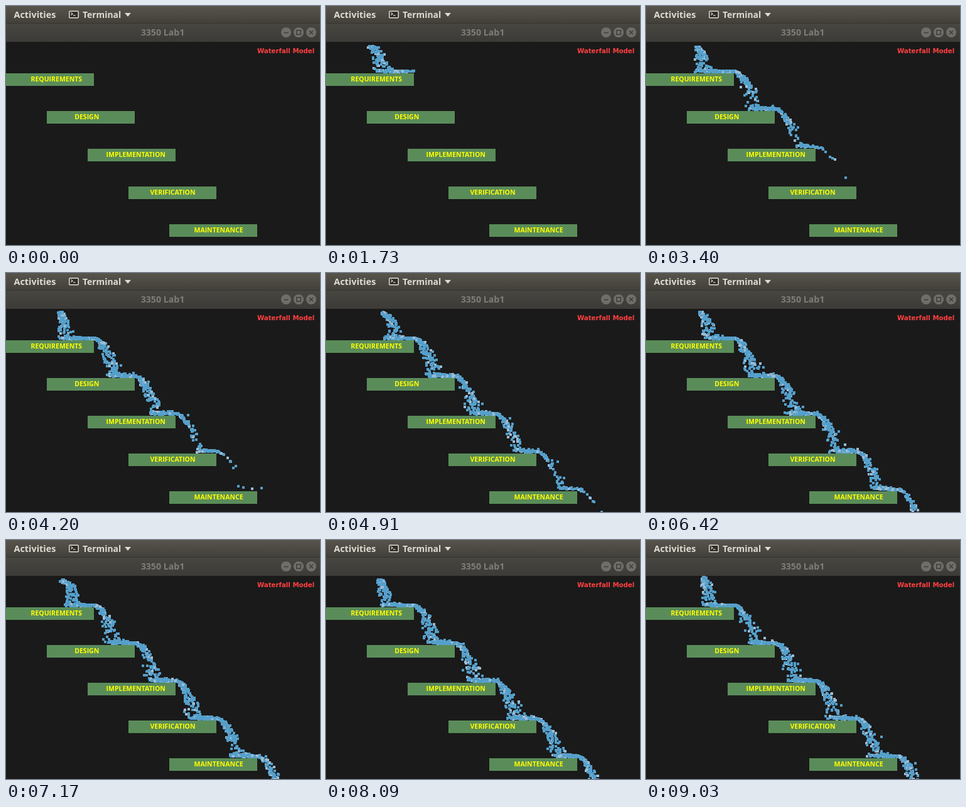
An HTML page with a canvas for the animation above (9.05 s loop, 500 px wide and 380 px high).

```html
<!DOCTYPE html>
<html lang="en">
<head>
<meta charset="utf-8">
<title>Waterfall Model</title>
<style>
  html, body { margin: 0; width: 100%; height: 100%; overflow: hidden; background: #1a1a1a; }
  canvas { display: block; }
</style>
</head>
<body>
<canvas id="stage" width="500" height="380"></canvas>
<script>
const ctx = document.getElementById('stage').getContext('2d');
const LOOP = 9050, START = 900, FRAME = 44.9;
const SUBSTEPS = 6, PER_SUBSTEP = 2, DT = FRAME / 1000 / SUBSTEPS;
const GRAVITY = 520, HALF = 2;

const steps = [
  ['REQUIREMENTS', 39.5], ['DESIGN', 109.2], ['IMPLEMENTATION', 159.5],
  ['VERIFICATION', 229.5], ['MAINTENANCE', 299.5]
].map(([label, textX], i) => ({ label, textX, x: 65 * i, y: 107 + 60 * i }));

// Pointer path that feeds the water: time, x, y
const pointer = [
  [900, 82, 62], [1400, 78, 63], [1730, 70, 64], [2600, 72, 64], [3000, 80, 64],
  [3400, 82, 66], [4200, 86, 63], [4680, 98, 64], [4910, 91, 64], [5450, 97, 64],
  [5720, 94, 65], [6500, 86, 63], [6950, 96, 64], [7170, 89, 64], [8000, 84, 64],
  [8700, 88, 63], [9050, 92, 60]
];

let seed, drops, frame;

function rnd() {
  seed = (seed * 1664525 + 1013904223) >>> 0;
  return seed / 4294967296;
}

function reset() {
  seed = 3350;
  drops = [];
  frame = 0;
}

function pointerAt(ms) {
  let i = 1;
  while (i < pointer.length - 1 && pointer[i][0] < ms) i++;
  const [t0, x0, y0] = pointer[i - 1], [t1, x1, y1] = pointer[i];
  const k = Math.min(1, (ms - t0) / (t1 - t0));
  return [x0 + (x1 - x0) * k, y0 + (y1 - y0) * k];
}

function emit(ms) {
  const [x, y] = pointerAt(ms);
  const drop = {
    x: x + rnd() * 6 - 3, y: y + rnd() * 4 - 2,
    vx: rnd() * 68, vy: rnd() * 30 - 10,
    speed: 30 + 42 * (rnd() + rnd()),
    rest: HALF + rnd() * 2.5,
    color: rnd() < 0.15 ? '#9dbcd3' : '#559fcb'
  };
  move(drop, rnd() * DT);
  drops.push(drop);
}

function move(d, dt) {
  const before = d.y;
  d.vy += GRAVITY * dt;
  d.x += d.vx * dt;
  d.y += d.vy * dt;
  for (const s of steps) {
    const floor = s.y - d.rest;
    if (d.x > s.x && d.x < s.x + 140 && before <= floor && d.y > floor) {
      d.y = floor;
      d.vy *= -(0.1 + 0.17 * rnd());
      d.vx += (d.speed - d.vx) * 0.6;
    }
  }
}

function advance() {
  for (let i = 0; i < SUBSTEPS; i++) {
    for (const d of drops) move(d, DT);
    for (let j = 0; j < PER_SUBSTEP; j++) emit(START + (frame + i / SUBSTEPS) * FRAME);
  }
  drops = drops.filter(d => d.y < 384);
  frame++;
}

function rect(x, y, w, h, fill) {
  ctx.fillStyle = fill;
  ctx.fillRect(x, y, w, h);
}

function text(str, x, y, font, fill, align = 'left') {
  ctx.font = font;
  ctx.fillStyle = fill;
  ctx.textAlign = align;
  ctx.fillText(str, x, y);
}

function line(points, color, width) {
  ctx.strokeStyle = color;
  ctx.lineWidth = width;
  ctx.beginPath();
  for (const [x, y] of points) ctx.lineTo(x, y);
  ctx.stroke();
}

function gradient(y0, y1, top, bottom) {
  const g = ctx.createLinearGradient(0, y0, 0, y1);
  g.addColorStop(0, top);
  g.addColorStop(1, bottom);
  return g;
}

function drawBars() {
  const light = '#dfdbd2', dark = '#3c3b37';
  rect(0, 0, 500, 28, gradient(0, 28, '#57544c', '#42403a'));
  text('Activities', 12.5, 19, 'bold 14.4px "Open Sans", sans-serif', light);
  text('Terminal', 122, 19, 'bold 13.9px "Open Sans", sans-serif', light);

  ctx.beginPath();
  ctx.roundRect(100.75, 8.25, 14.5, 10.5, 1);
  ctx.fillStyle = '#2e2d2a';
  ctx.fill();
  ctx.strokeStyle = light;
  ctx.lineWidth = 1.5;
  ctx.stroke();
  line([[103.5, 10.5], [106, 12.5], [103.5, 14.5]], light, 1.2);
  line([[107, 15], [110.5, 15]], light, 1.2);

  ctx.fillStyle = light;
  ctx.beginPath();
  ctx.moveTo(189, 11);
  ctx.lineTo(199, 11);
  ctx.lineTo(194, 17);
  ctx.fill();

  rect(0, 27, 500, 30, '#2a5088');
  rect(0, 27, 500, 1, '#35342f');
  ctx.beginPath();
  ctx.roundRect(0, 28, 500, 29, [2, 2, 0, 0]);
  ctx.fillStyle = gradient(28, 57, '#474641', dark);
  ctx.fill();
  text('3350 Lab1', 249.5, 47, 'bold 14.2px "Open Sans", sans-serif', '#807d78', 'center');

  for (const x of [446, 466, 486]) {
    ctx.beginPath();
    ctx.arc(x, 42, 8, 0, 7);
    ctx.fillStyle = '#706e69';
    ctx.fill();
  }
  line([[442.5, 42.5], [449.5, 42.5]], dark, 1.4);
  ctx.strokeRect(462.7, 38.7, 6.6, 6.6);
  line([[483, 39], [489, 45]], dark, 1.4);
  line([[489, 39], [483, 45]], dark, 1.4);
}

function draw() {
  rect(0, 0, 500, 380, '#1a1a1a');
  drawBars();
  for (const s of steps) rect(s.x, s.y, 140, 20, '#5a8c5a');
  for (const d of drops) rect(Math.round(d.x) - HALF, Math.round(d.y) - HALF, 4, 4, d.color);
  for (const s of steps) text(s.label, s.textX, s.y + 13, 'bold 10.5px "Open Sans", sans-serif', '#ffff00');
  text('Waterfall Model', 400, 75, 'bold 10.2px "DejaVu Sans", sans-serif', '#ff4040');
}

function tick() {
  const t = performance.now() % LOOP;
  const wanted = t < START ? 0 : Math.floor((t - START) / FRAME) + 1;
  if (wanted < frame) reset();
  while (frame < wanted) advance();
  draw();
  requestAnimationFrame(tick);
}

reset();
tick();
</script>
</body>
</html>
```
